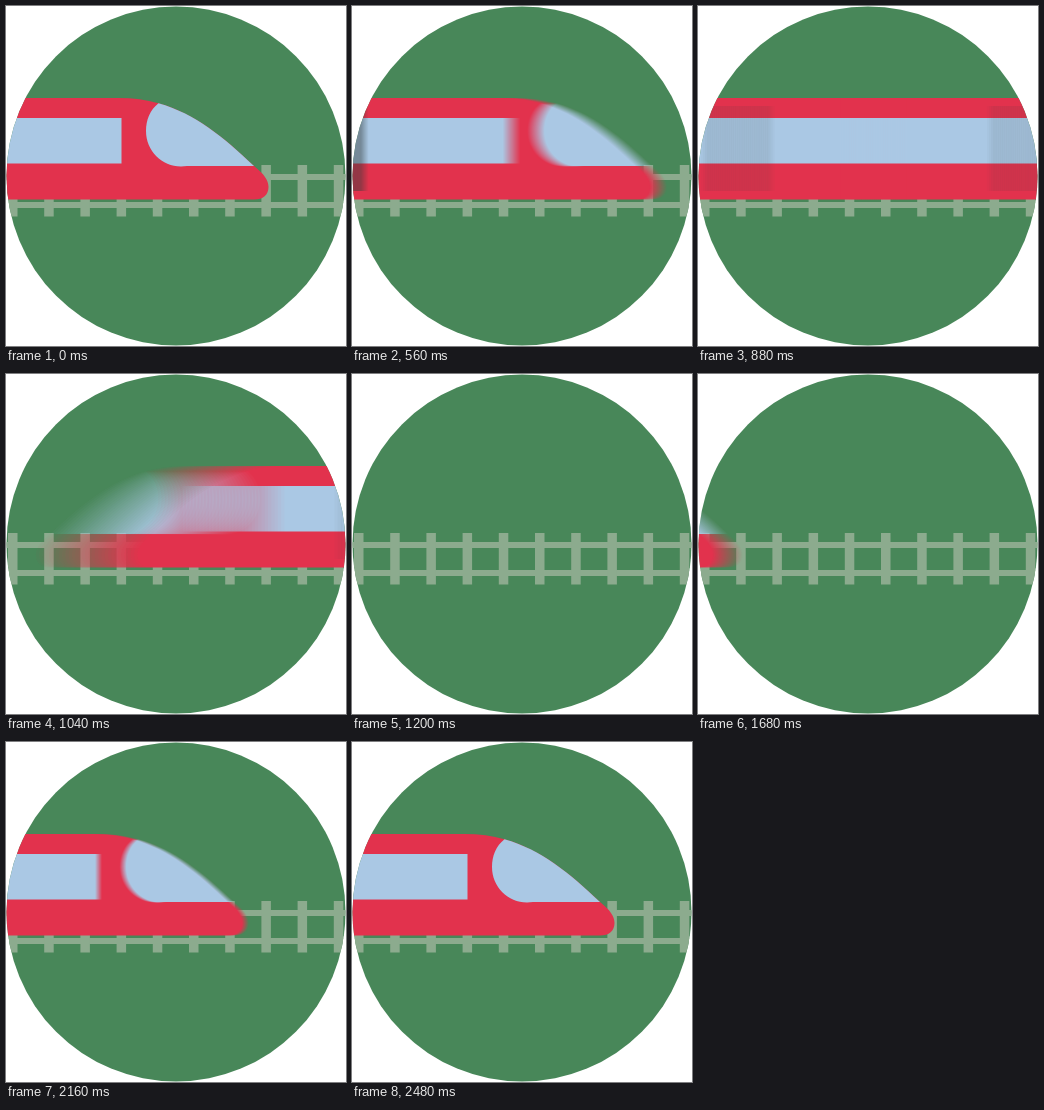
Write an HTML page without scripts that moves like this. It is 340 px wide and 340 px high and loops after 2.88 s.

```html
<!DOCTYPE html>
<html lang="en">
<head>
<meta charset="utf-8">
<title>Passing train</title>
<style>
  @property --out { syntax: "<number>"; inherits: true; initial-value: 0; }
  @property --in { syntax: "<number>"; inherits: true; initial-value: 0; }

  html, body { margin: 0; width: 100%; height: 100%; overflow: hidden; background: #fff; }

  /* --out and --in count 80 ms ticks; position is a cubic of them, smear is half its speed */
  svg {
    display: block; width: 100%; height: 100%;
    animation: ride 2880ms -2ms infinite;
    --pos: calc(var(--out) * var(--out) * (2.95 + 0.645 * var(--out))
              - var(--in) * var(--in) * (0.8435 + 0.1485 * var(--in)));
    --smear: calc(var(--out) * (2.95 + 0.9675 * var(--out))
                + var(--in) * (0.8435 + 0.22275 * var(--in)));
  }
  @keyframes ride {
    0% { --out: 0; --in: 0; animation-timing-function: step-end; }
    11.1111% { --out: 0; --in: 0; animation-timing-function: steps(11); }
    41.6667% { --out: 11; --in: 0; animation-timing-function: step-end; }
    58.3333% { --out: 0; --in: 10; animation-timing-function: steps(10); }
    86.1111%, 100% { --out: 0; --in: 0; }
  }

  .train { transform: translate(calc(var(--pos) * 1px), 0); isolation: isolate; }

  /* motion blur: each level averages two shifted copies of the one below */
  .back, .fore { opacity: .5; }
  .back { transform: translate(calc(var(--smear) * var(--k) * -1px), 0); }
  .fore { transform: translate(calc(var(--smear) * var(--k) * 1px), 0); mix-blend-mode: plus-lighter; }

  .rail { stroke: #8cab8e; fill: none; }
  .body { fill: #e1324d; }
  .glass { fill: #a9c7e3; }
  .joint { fill: #343c3c; }
</style>
</head>
<body>
<svg viewBox="0 0 340 340">
  <defs>
    <clipPath id="disc"><circle cx="170" cy="170" r="169.5"/></clipPath>

    <g id="half">
      <path class="body" d="M-190 92H113C170 92 208 122 248 160C258 168 262.5 174 262.5 181C262.5 189 257 193.5 248 193.5H-190Z"/>
      <path class="glass" d="M-190 112H115.500V157.500H-190Z"/>
      <path class="glass" d="M152.500 97.300C189.100 107.500 218 131.500 248 160H181L175 160.500C156 160.500 140 145 140 125C140 114 144 104 152.500 97.300Z"/>
      <rect class="joint" x="-44" y="100" width="8" height="85"/>
    </g>

    <g id="b0">
      <use href="#half" transform="translate(-366 0) scale(-1 1)"/>
      <use href="#half"/>
    </g>
    <g id="b1" style="--k:.015625"><use href="#b0" class="back"/><use href="#b0" class="fore"/></g>
    <g id="b2" style="--k:.03125"><use href="#b1" class="back"/><use href="#b1" class="fore"/></g>
    <g id="b3" style="--k:.0625"><use href="#b2" class="back"/><use href="#b2" class="fore"/></g>
    <g id="b4" style="--k:.125"><use href="#b3" class="back"/><use href="#b3" class="fore"/></g>
    <g id="b5" style="--k:.25"><use href="#b4" class="back"/><use href="#b4" class="fore"/></g>
  </defs>

  <g clip-path="url(#disc)">
    <rect width="340" height="340" fill="#488759"/>
    <path class="rail" stroke-width="6" d="M0 171H340M0 199H340"/>
    <path class="rail" stroke-width="51.500" stroke-dasharray="9.5 26.7" d="M2 184.700H340"/>
    <g class="train"><use href="#b5"/></g>
  </g>
</svg>
</body>
</html>
```
